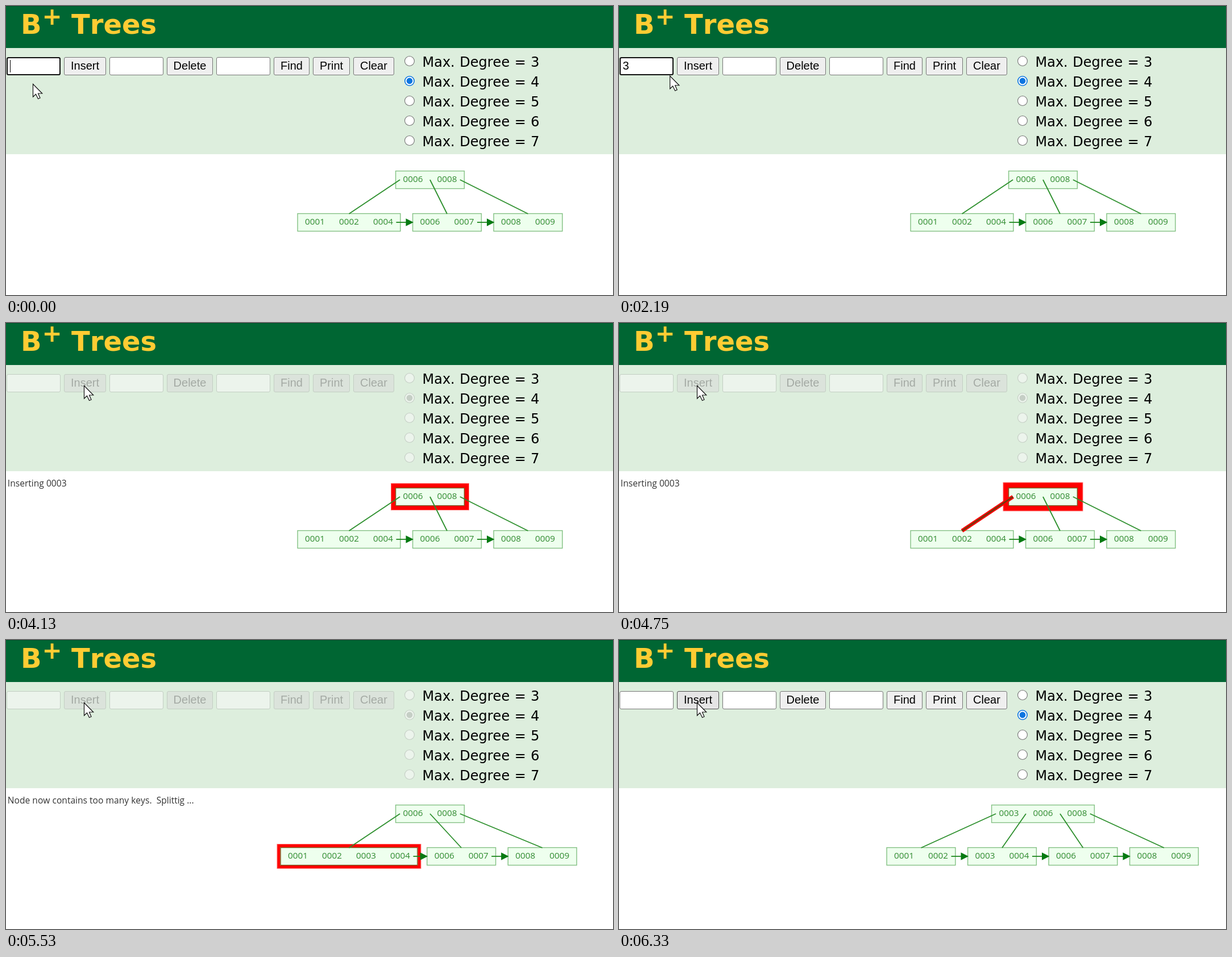
Write an HTML page with a canvas that moves like this. It is 1068 by 509 pixels and loops after 7.04 s.

```html
<!DOCTYPE html>
<html lang="en">
<head>
<meta charset="utf-8">
<title>B+ Trees</title>
<style>
  html, body { margin: 0; height: 100%; overflow: hidden; background: #fff; }
  canvas { display: block; }
</style>
</head>
<body>
<canvas id="stage" width="1068" height="509"></canvas>
<script>
const ctx = document.getElementById('stage').getContext('2d');
const LOOP = 7040;
const TITLE = '"DejaVu Sans", sans-serif';
const UI = '"Liberation Sans", Arial, sans-serif';
const TREE = '"Open Sans", "Noto Sans", sans-serif';
const ROOT_Y = 306, LEAF_Y = 381;

// Key times in ms
const T = { type: 1330, move: 1920, stop: 2540, press: 3600, run: 3800, root: 4130,
            edge: 4480, leaf: 4830, grow: 5200, split: 5670, settled: 5970, ready: 6330 };

const clamp = v => Math.max(0, Math.min(1, v));
const lerp = (a, b, p) => a + (b - a) * p;
const between = (t, a, b) => t >= a && t < b;

function text(str, x, y, font, color, align = 'left', wordSpacing = 0) {
  ctx.font = font;
  ctx.fontKerning = 'none';
  ctx.wordSpacing = wordSpacing + 'px';
  ctx.fillStyle = color;
  ctx.textAlign = align;
  ctx.fillText(str, x, y);
}

function rect(x, y, w, h, color) {
  ctx.fillStyle = color;
  ctx.fillRect(x, y, w, h);
}

function roundBox(x, y, w, h, fill, stroke, line = 1) {
  ctx.beginPath();
  ctx.roundRect(x + line / 2, y + line / 2, w - line, h - line, 2.5);
  ctx.fillStyle = fill;
  ctx.fill();
  ctx.strokeStyle = stroke;
  ctx.lineWidth = line;
  ctx.stroke();
}

function disc(x, y, r, fill) {
  ctx.beginPath();
  ctx.arc(x, y, r, 0, 7);
  ctx.fillStyle = fill;
  ctx.fill();
}

function line(x1, y1, x2, y2, color, width) {
  ctx.beginPath();
  ctx.moveTo(x1, y1);
  ctx.lineTo(x2, y2);
  ctx.strokeStyle = color;
  ctx.lineWidth = width;
  ctx.stroke();
}

function pointer(t) {
  if (t < T.move) return [47, t < 70 ? 137 : t < 200 ? 135.5 : 134];
  const p = clamp((t - T.move + 50) / (T.stop - T.move + 50));
  const ease = p * p * (3 - 2 * p);
  return [lerp(47, 137, ease), lerp(134, 110, ease)];
}

function drawPointer([x, y]) {
  ctx.beginPath();
  [[.5, .5], [.5, 23], [5.5, 18.3], [9.5, 26.5], [13, 25], [9.5, 17], [16.7, 17]]
    .forEach(([dx, dy]) => ctx.lineTo(x + dx, y + dy));
  ctx.closePath();
  ctx.fillStyle = '#fff';
  ctx.fill();
  ctx.strokeStyle = '#111';
  ctx.lineWidth = 1.2;
  ctx.stroke();
}

function drawHeader() {
  rect(0, 0, 1068, 74, '#006633');
  rect(0, 0, 1068, 1, '#00502a');
  rect(0, 74, 1068, 187, '#ddeedd');
  text('B', 26, 49, 'bold 48px ' + TITLE, '#ffcc33');
  text('+', 63.4, 32.5, 'bold 42px ' + TITLE, '#ffcc33');
  text('Trees', 115, 49, 'bold 48px ' + TITLE, '#ffcc33');
}

function drawControls(t, [px, py]) {
  const off = between(t, T.run, T.ready);
  const focused = t < T.press;
  const border = off ? '#c3cec3' : '#767676';

  for (const x of [1, 182, 370])
    roundBox(x, 90, 95, 32, off ? '#ecf4ec' : '#fff', border);
  if (focused) roundBox(1, 90, 95, 32, '#fff', '#101010', 2);

  const typed = between(t, T.type, T.run);
  if (typed) text('3', 6.5, 112, '20px ' + UI, '#000');
  const caret = t < 70 || between(t, 600, 1130) || between(t, T.type, T.move) ||
                between(t, 2400, 2940) || between(t, 3470, T.press);
  if (caret) rect(typed ? 17 : 7, 95, 1, 22, '#000');

  const buttons = [['Insert', 102, 74], ['Delete', 283, 81], ['Find', 471, 63],
                   ['Print', 540, 65], ['Clear', 611, 72]];
  for (const [label, x, w] of buttons) {
    const hover = !off && px > x && px < x + w && py < 122;
    const pressed = hover && between(t, T.press, T.run);
    const fill = off ? '#dbe3db' : pressed ? '#f5f5f5' : hover ? '#e5e5e5' : '#efefef';
    roundBox(x, 90, w, 32, fill, hover ? '#4f4f4f' : border);
    text(label, x + w / 2, 112, '20px ' + UI, off ? '#a4aaa4' : '#000', 'center');
  }

  for (let i = 0; i < 5; i++) {
    const y = 97 + 35 * i, on = i === 1;
    const ring = off ? '#c5cec5' : on ? '#0c75e0' : '#767676';
    disc(710, y, 9, ring);
    disc(710, y, on && !off ? 7.4 : 7.9, off ? '#ecf4ec' : '#fff');
    if (on) disc(710, y, 5.4, ring);
    text('Max. Degree = ' + (i + 3), 732.5, y + 10, '24px ' + TITLE, '#000', 'left', 0.9);
  }
}

// Triangle wave between 4.5 and 10.5 px, peaking at 4550 ms
function pulse(t) {
  const phase = (t + 490) % 1680;
  return 4.5 + 6 * Math.abs(phase / 840 - 1);
}

const halfWidth = node => 30 * node.keys.length + 1;

function drawNode(node, y, glow) {
  const h = halfWidth(node), left = node.x - h;
  if (glow) {
    rect(left - glow - .5, y - 16.5 - glow, 2 * h + 2 * glow + 1, 33 + 2 * glow, '#ff7f7f');
    rect(left - glow + .5, y - 15.5 - glow, 2 * h + 2 * glow - 1, 31 + 2 * glow, '#ff0000');
  }
  rect(left, y - 16, 2 * h, 32, '#eeffee');
  ctx.strokeStyle = glow ? '#7a5a20' : '#84c084';
  ctx.lineWidth = 1.4;
  ctx.strokeRect(left + .6, y - 15.4, 2 * h - 1.2, 31);
  node.keys.forEach((key, i) =>
    text('000' + key, node.x + (i + .5) * 60 - node.keys.length * 30, y + 4.4,
         '15.3px ' + TREE, '#2f8a2f', 'center'));
}

function drawLink(root, i, child, glow) {
  const n = root.keys.length;
  const inset = i === 0 ? 7.2 : i === n ? -7.2 : 0;
  const x = root.x + (i - n / 2) * 60 + inset;
  if (glow) line(x, ROOT_Y, child.x, LEAF_Y - 15, '#ff0000', glow * .75);
  line(x, ROOT_Y, child.x, LEAF_Y - 15, glow ? '#6b3a0c' : '#2c8f2c', glow ? 2.6 : 1.8);
}

function drawArrow(from, to) {
  const start = from.x + halfWidth(from) - 8, end = to.x - halfWidth(to) + 2;
  const dir = Math.sign(end - start) || 1;
  line(start, LEAF_Y, end - dir * 8, LEAF_Y, '#1f871f', 1.8);
  ctx.beginPath();
  ctx.moveTo(end, LEAF_Y);
  ctx.lineTo(end - dir * 13.5, LEAF_Y - 6.8);
  ctx.lineTo(end - dir * 13.5, LEAF_Y + 6.8);
  ctx.fillStyle = '#067a12';
  ctx.fill();
}

function treeAt(t) {
  if (t < T.split) {
    const grow = 30 * clamp((t - T.grow - 20) / 370);
    return {
      root: { x: 746, keys: [6, 8] },
      leaves: [{ x: 603.5, keys: t < T.grow ? [1, 2, 4] : [1, 2, 3, 4] },
               { x: 776 + grow, keys: [6, 7] }, { x: 918.5 + grow, keys: [8, 9] }]
    };
  }
  const p = clamp((Math.floor((t - T.split) / 60) + 1) / 6);
  const leaf = (a, b, keys) => ({ x: lerp(a, b, p), keys });
  return {
    root: { x: 746, keys: [3, 6, 8] },
    leaves: [leaf(603.5, 531.5, [1, 2]), leaf(603.5, 674, [3, 4]),
             leaf(806, 816.5, [6, 7]), leaf(948.5, 959, [8, 9])]
  };
}

function drawTree(t) {
  const { root, leaves } = treeAt(t);
  const glow = pulse(t);
  drawNode(root, ROOT_Y, between(t, T.root, T.leaf) && glow);
  leaves.forEach((leaf, i) =>
    drawNode(leaf, LEAF_Y, i === 0 && between(t, T.leaf, T.split) && glow));
  leaves.forEach((leaf, i) => {
    drawLink(root, i, leaf, i === 0 && between(t, T.edge, T.leaf) && glow);
    if (i) drawArrow(leaves[i - 1], leaf);
  });

  const message = between(t, T.run, T.grow) ? 'Inserting 0003'
    : between(t, T.grow, T.split) ? 'Node now contains too many keys.  Splittig ...' : '';
  text(message, 2.8, 288, '15.6px ' + TREE, '#333');
}

function draw(now) {
  const t = now % LOOP, tip = pointer(t);
  rect(0, 0, 1068, 509, '#fff');
  drawHeader();
  drawControls(t, tip);
  drawTree(t);
  drawPointer(tip);
}

const began = performance.now();
function tick() {
  draw(performance.now() - began);
  requestAnimationFrame(tick);
}
tick();
</script>
</body>
</html>
```
